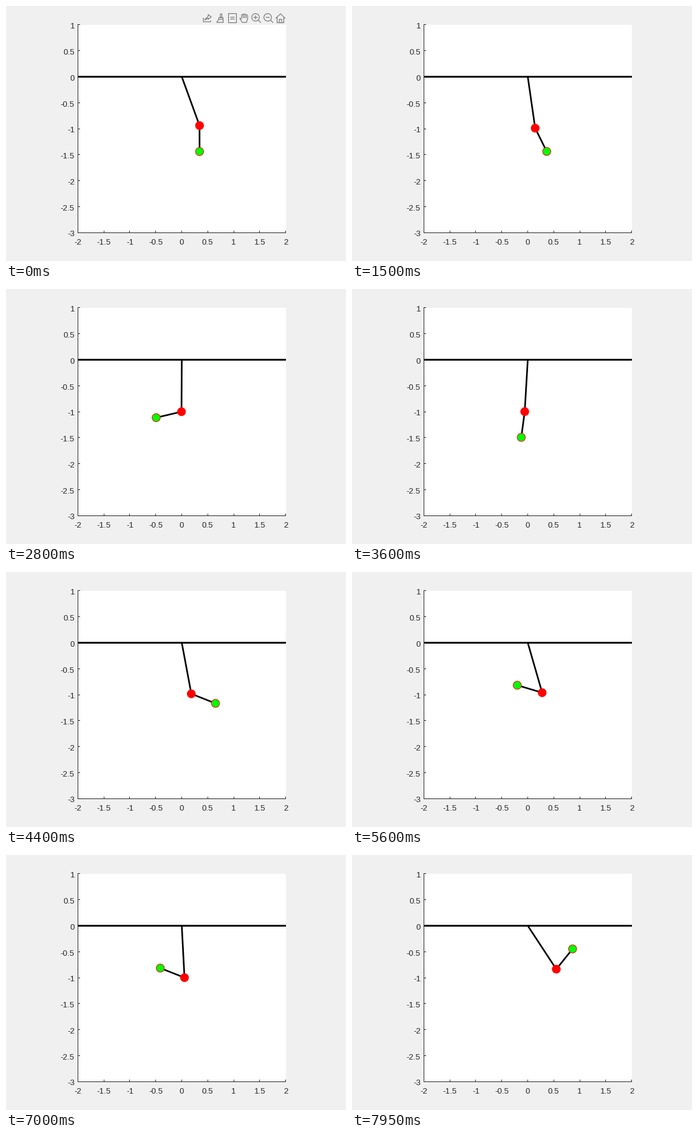
Write a matplotlib script that moves like this. It is 560 by 420 pixels and loops after 8000 ms.

```python
import numpy as np
import matplotlib.pyplot as plt
from matplotlib.animation import FuncAnimation
from matplotlib.patches import Circle, Rectangle

W, H, DPI = 560, 420, 100
PX = 72 / DPI                      # one pixel in points
X0, Y0, UNIT = 289.5, 116.5, 85.6  # pivot and pixels per axis unit
L1, L2 = 1.0, 0.5
FRAMES, INTERVAL = 160, 50
INK, GRAY = "#262626", "#6e6e6e"

# key poses: time step, upper and lower arm angle (degrees from straight down)
POSES = np.array([
    (14, 20, 0), (30, 8.2, 26.3), (39, -9, 90), (48, -8.5, 198),
    (52, 1.5, 243), (56, -0.3, 283.2), (66, -11.2, 344), (76, 3, 359),
    (88, 10.6, 428.4), (99, 20, 540), (106, 38.5, 617), (112, 16.1, 613.4),
    (118, -27, 553), (125, -56, 541), (133, -32, 607), (140, 3, 608.5),
    (150, 34.5, 572), (159, 33.3, 501.2),
])
STEP, ANGLES = POSES[:, 0], POSES[:, 1:]
SLOPES = np.gradient(ANGLES, STEP, axis=0)
SLOPES[0] = 0                      # released from rest


def angles_at(n):
    """Cubic Hermite interpolation of both angles, in radians."""
    n = max(n, STEP[0])
    i = min(np.searchsorted(STEP, n, side="right") - 1, len(STEP) - 2)
    h = STEP[i + 1] - STEP[i]
    u = (n - STEP[i]) / h
    value = ((1 + 2 * u) * (1 - u) ** 2 * ANGLES[i]
             + u * (1 - u) ** 2 * h * SLOPES[i]
             + u * u * (3 - 2 * u) * ANGLES[i + 1]
             + u * u * (u - 1) * h * SLOPES[i + 1])
    return np.radians(value)


def to_px(x, y):
    return X0 + UNIT * x, Y0 - UNIT * y


def pixel_center(v):
    return np.floor(v) + 0.5


plt.rcParams.update({"font.family": "Liberation Sans", "path.snap": False})
fig = plt.figure(figsize=(W / DPI, H / DPI), dpi=DPI, facecolor="#f0f0f0")
ax = fig.add_axes([0, 0, 1, 1])
ax.set_xlim(0, W)
ax.set_ylim(H, 0)
ax.axis("off")


def stroke(xs, ys, color=INK, width=1.0, **kw):
    kw.setdefault("solid_capstyle", "butt")
    return ax.plot(xs, ys, color=color, lw=width * PX, **kw)[0]


# plot area, axis lines, ticks and labels
LEFT, TOP, RIGHT, BOTTOM = 118, 31, 461, 374
ax.add_patch(Rectangle((LEFT, TOP), RIGHT - LEFT, BOTTOM - TOP,
                       fc="white", ec="none"))
stroke([LEFT + 0.5] * 2, [TOP, BOTTOM], zorder=3)
stroke([LEFT, RIGHT], [BOTTOM - 0.5] * 2, zorder=3)
for k in range(9):
    xv, yv = -2 + k / 2, -3 + k / 2
    x, y = to_px(xv, yv)
    stroke([pixel_center(x)] * 2, [BOTTOM, BOTTOM - 4], zorder=3)
    stroke([LEFT, LEFT + 4], [pixel_center(y)] * 2, zorder=3)
    label = dict(color=INK, fontsize=13.33 * PX, va="baseline")
    ax.text(x, 393, f"{xv:g}", ha="center", **label)
    ax.text(113, y + 6.2, f"{yv:g}", ha="right", **label)
stroke([LEFT, RIGHT], [Y0, Y0], "black", 3, zorder=4)

# toolbar, each icon drawn around its own center
toolbar = []


def icon(cx, *points):
    xs, ys = np.transpose(points)
    toolbar.append(stroke(cx + xs, 20 + ys, GRAY, 1.1, zorder=6))


def arc(cx, x, y, r, start=0, end=360):
    a = np.radians(np.linspace(start, end, 30))
    icon(cx, *zip(x + r * np.cos(a), y + r * np.sin(a)))


def box(cx, x, y, w, h):
    icon(cx, (x, y), (x + w, y), (x + w, y + h), (x, y + h), (x, y))


EXPORT, BRUSH, TIP, HAND, HOME = 332, 353, 372, 392, 452
icon(EXPORT, (-6, 0), (-7, 0), (-7, 6), (5, 6), (5, 4))
icon(EXPORT, (-5, 3), (1, -3), (1, -6), (6, -2), (1, 2), (1, 0), (-5, 3))
box(BRUSH, 0, -7, 2.5, 6)
box(BRUSH, -2.5, -1, 7, 3)
icon(BRUSH, (-2.5, 2), (-6, 7), (5, 7), (4.5, 2))
box(TIP, -5.5, -7.5, 13, 15)
for y in (-1.5, 1.5):
    icon(TIP, (-2.5, y), (4.5, y))
for i in range(4):                 # fingers
    x, tip_y = -4 + 2.5 * i, -6 + abs(i - 1.3)
    icon(HAND, (x, 0), (x, tip_y))
    arc(HAND, x + 1.2, tip_y, 1.2, 180, 360)
icon(HAND, (-4, 1), (-7, 0), (-3, 7), (4, 7), (6, 1), (6, -4))
for lens in (411, 431):
    arc(lens, 0, -1.3, 6.2)
    icon(lens, (4.5, 3.2), (9, 7.5))
    icon(lens, (-3.2, -1.3), (3.2, -1.3))
icon(411, (0, -4.5), (0, 1.9))
icon(HOME, (-8, 0.5), (0, -7.2), (8, 0.5))
icon(HOME, (-5.5, -1.5), (-5.5, 7.5), (5.5, 7.5), (5.5, -1.5))
box(HOME, -2, 2, 4, 5.5)

# pendulum
arms = stroke([], [], "black", 2.67, zorder=5, solid_joinstyle="round")


def bob(face):
    return ax.add_patch(Circle((0, 0), 6.67, fc=face, ec="red",
                               lw=PX, zorder=6))


elbow, tip = bob("red"), bob("lime")


def update(n):
    a, b = angles_at(n)
    joints_x = np.cumsum([0, L1 * np.sin(a), L2 * np.sin(b)])
    joints_y = -np.cumsum([0, L1 * np.cos(a), L2 * np.cos(b)])
    xs, ys = to_px(joints_x, joints_y)
    arms.set_data(xs, ys)
    elbow.center = xs[1], ys[1]
    tip.center = xs[2], ys[2]
    for part in toolbar:
        part.set_visible(n == 0)
    return [arms, elbow, tip, *toolbar]


anim = FuncAnimation(fig, update, frames=FRAMES, interval=INTERVAL,
                     repeat=True, repeat_delay=0, blit=False)
plt.show()
```
